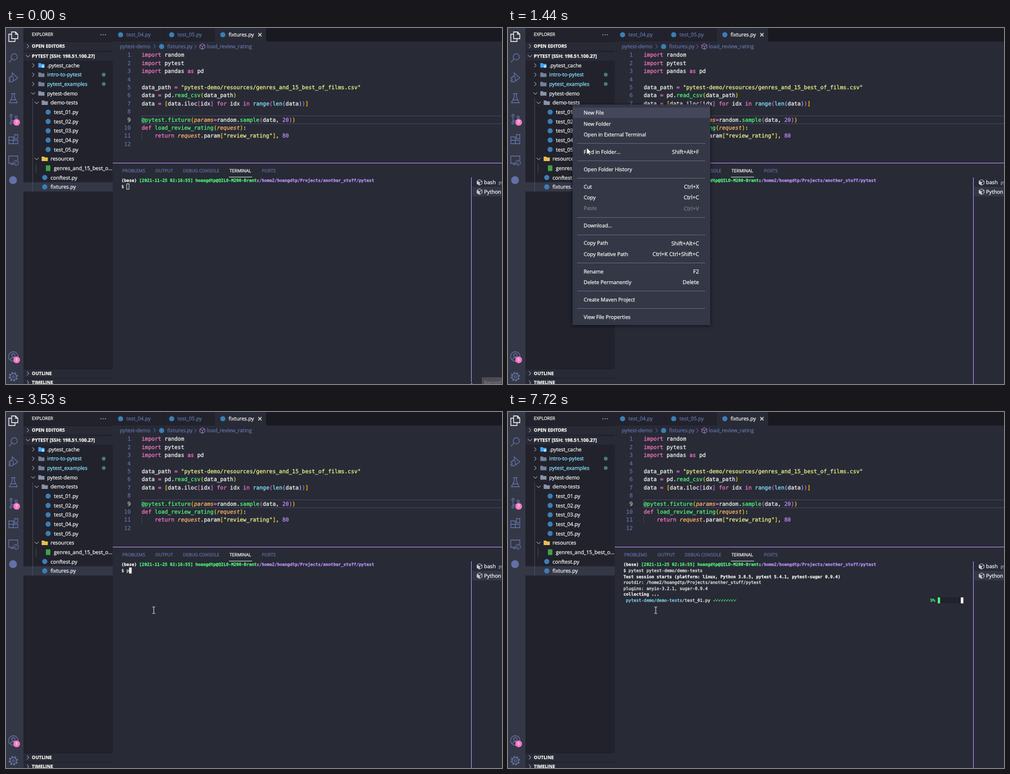
These frames come from a looping animation (883x634 px, 8000 ms). An HTML page:

```html
<!DOCTYPE html>
<html lang="en">
<head>
<meta charset="utf-8">
<title>Running tests from the editor</title>
<style>
html, body { margin: 0; width: 100%; height: 100%; overflow: hidden; background: #282a36; }
svg { display: block; width: 100%; height: 100%; }
text { white-space: pre; font-family: "Open Sans", "Noto Sans", sans-serif; text-rendering: geometricPrecision; stroke-width: .25px; }
.mono { font-family: "DejaVu Sans Mono", "Noto Sans Mono", monospace; }
.tick { font-family: "DejaVu Sans", sans-serif; }
</style>
</head>
<body>
<svg id="stage" viewBox="0 0 883 634"></svg>
<script>
const C = { fg: '#f8f8f2', dim: '#6272a4', bg: '#282a36', side: '#21222c', bar: '#343746', sel: '#44475a',
  p: '#ff79c6', y: '#f1fa8c', g: '#50fa7b', o: '#ffb86c', n: '#bd93f9', c: '#8be9fd' };
const LOOP = 8000, USER = 'hoangdtp', HOME = `/home2/${USER}/Projects/another_stuff/pytest`;

// Drawing helpers; text is placed by its vertical centre, on a whole-pixel baseline.
const ink = col => `fill="${col}" stroke="${col}"`;
const text = (x, y, s, size = 9.25, fill = C.fg, more = '') =>
  `<text x="${x}" y="${Math.round(y + size * .35)}" font-size="${size}" ${ink(fill)} ${more}>${s}</text>`;
const rect = (x, y, w, h, fill, more = '') => `<rect x="${x}" y="${y}" width="${w}" height="${h}" fill="${fill}" ${more}/>`;
const disc = (x, y, r, fill) => `<circle cx="${x}" cy="${y}" r="${r}" fill="${fill}"/>`;
const line = (x, y, d, stroke, w = 1, more = '') =>
  `<path transform="translate(${x} ${y})" d="${d}" fill="none" stroke="${stroke}" stroke-width="${w}" ${more}/>`;
const bold = 'font-weight="700"';
const right = 'text-anchor="end"';
const span = (fill, s, more = '') => `<tspan ${ink(fill)} ${more}>${s}</tspan>`;
const chevron = (x, y, open, col = '#c5c8d4') => line(x, y, open ? 'M-3.5-1.8 0 1.8 3.5-1.8' : 'M-1.8-3.5 1.8 0-1.8 3.5', col, 1);
const folder = (x, y, fill) => `<path transform="translate(${x} ${y})" d="M-5.5-4h4.2l1.4 1.5h5.4v6.5h-11z" fill="${fill}"/>`;
const pyIcon = (x, y) => disc(x, y, 4.6, '#3c7eb5');
const cube = (x, y, col, w = 1) => line(x, y, 'M0-5 4.5-2.5V2.5L0 5-4.5 2.5V-2.5ZM-4.5-2.5 0 0 4.5-2.5M0 0V5', col, w);
const shellIcon = y => cube(843, y, '#c5c8d4') + `<path transform="translate(843 ${y})" d="M-4.5-2.5 0 0V5L-4.5 2.5Z" fill="#c5c8d4"/>`;

function activityBar() {
  const icon = (y, d, col = C.dim) => line(13, y, d, col, 1.3);
  const badge = (y, s) => disc(19, y, 6, C.p) + text(19, y, s, 7, C.fg, 'text-anchor="middle"');
  const ring = r => `M${-r} 0a${r} ${r} 0 1 0 ${2 * r} 0a${r} ${r} 0 1 0 ${-2 * r} 0`;
  return rect(0, 0, 31, 634, C.bar) +
    icon(15, 'M-3-8H4L8-4V4H-3ZM4-8V-4H8M-3-4H-8V9H3V4', C.fg) +
    icon(52, 'M-3 2a5.5 5.5 0 1 1 2 2ZM-2 3-8 9') +
    icon(89, 'M-2-3V-9L8 0 1 5M-6 0a3 3 0 0 1 6 0v4a3 3 0 0 1-6 0ZM-9-1l3 2M-9 4h3M-8 8l2-2M0 4h3') +
    icon(125, 'M-4-8H4M-2-8V-2L-7 8H7L2-2V-8M-5 3H5') +
    icon(162, 'M-6-6a2 2 0 1 0 4 0a2 2 0 1 0-4 0M-4-4V5M-6 7a2 2 0 1 0 4 0a2 2 0 1 0-4 0M3-3a2 2 0 1 0 4 0a2 2 0 1 0-4 0M5-1Q5 3-4 3') + badge(168, 7) +
    icon(198, 'M-8-4H0V8H-8ZM-8 2H8V8H0M2-8H8V-1H2Z') +
    icon(235, 'M0 6H-8V-7H8V0M-4 8H0') + line(18, 240, ring(4.3), C.dim, 1.2) + line(18, 240, 'M-2-1 0 1-2 3M2-3 0-1', C.dim, 1) +
    disc(12.5, 271, 7, C.dim) +
    icon(585, ring(8.5) + 'M-3-2a3 3 0 1 0 6 0a3 3 0 1 0-6 0M-6 6Q0-2 6 6') + badge(591, 1) +
    line(13, 621, ring(6.8), C.dim, 3, 'stroke-dasharray="3 2.34"') + line(13, 621, ring(5.5), C.dim, 1.3) + line(13, 621, ring(2), C.dim, 1.2);
}

const rowY = i => 66.5 + 16.65 * i;

function sidebar() {
  // kind: > closed folder, v open folder, p Python file, x table
  const tree = [
    ['>', 0, '.pytest_cache', '#42a5f5'], ['>', 0, 'intro-to-pytest', '#76809a', 1], ['>', 0, 'pytest_examples', '#76809a', 1],
    ['v', 0, 'pytest-demo', '#8a93ab'], ['v', 1, 'demo-tests', '#8a93ab'],
    ...[1, 2, 3, 4, 5].map(n => ['p', 2, `test_0${n}.py`]),
    ['v', 1, 'resources', '#eac04c'], ['x', 2, 'genres_and_15_best_o...'], ['p', 1, 'conftest.py'], ['p', 1, 'fixtures.py']];
  let s = rect(31, 0, 159, 634, C.side) + text(46, 11, 'EXPLORER', 7.9) + [169, 173, 177].map(x => disc(x, 12, .8, C.fg)).join('');
  for (const [y, label, open] of [[32.5, 'OPEN EDITORS', 0], [50, '', 1], [615, 'OUTLINE', 0], [631.5, 'TIMELINE', 0]])
    s += rect(31, y - 8.5, 159, 16.6, C.bg) + rect(31, y - 8.5, 159, .8, '#191a21') + chevron(39, y, open) + text(46, y, label, 8.1, C.fg, bold);
  s += rect(31, rowY(13) - 8.3, 159, 16.6, C.bar) + '<g id="hover"></g>' +
    line(47.5, 0, 'M0 125V291', '#505363', .8) + line(53.5, 0, 'M0 242V258', '#505363', .8);
  tree.forEach(([kind, depth, name, col, changed], i) => {
    const x = 63 + 6 * depth, y = rowY(i);
    if (kind == 'p') s += pyIcon(x, y);
    else if (kind == 'x') s += rect(x - 4, y - 5, 8, 10, '#43a047');
    else s += chevron(x - 14.5, y, kind == 'v') + folder(x, y, col);
    if (!i) s += disc(x + 3, y + 2, 2.4, '#b3dcfb');
    s += text(x + 10.3, y, name, 9.25, changed ? C.c : C.fg);
    if (changed) s += disc(174, y, 3.3, '#467f74');
  });
  return s + '<g id="header"></g>';
}

const code = ['{p import} random', '{p import} pytest', '{p import} pandas {p as} pd', '',
  'data_path {p =} {y "pytest-demo/resources/genres_and_15_best_of_films.csv"}',
  'data {p =} pd.{g read_csv}(data_path)',
  'data {p =} [data.iloc[idx] {p for} idx {p in} {c range}({c len}(data))]', '',
  '{g @pytest.fixture}({o params}{p =}random.{g sample}(data, {n 20}))',
  '{p def} {g load_review_rating}({o request}):',
  '    {p return} {o request}.param[{y "review_rating"}], {n 80}', ''];

function paint(src) {
  const levels = ['#ffd700', '#da70d6', '#87cefa'];
  let depth = 0;
  return src.replace(/\{(\w) ([^}]*)\}|[\[(]|[\])]/g, (m, key, s) =>
    key ? span(C[key], s, key == 'o' ? 'font-style="italic"' : '')
      : span(levels['[('.includes(m) ? depth++ : --depth], m));
}

function editor() {
  let s = rect(190, 0, 693, 24, '#191a21') + rect(190, 0, 182, 24, C.side) + rect(372, 0, 91, 24, C.bg) + rect(281, 0, .8, 24, '#191a21');
  ['test_04.py', 'test_05.py', 'fixtures.py'].forEach((name, i) => {
    const x = 204 + 91 * i;
    s += pyIcon(x, 12) + text(x + 10.3, 12, name, 9.25, i == 2 ? C.fg : C.dim);
  });
  s += line(452, 12, 'M-3-3 3 3M3-3-3 3', C.fg, 1.1);
  s += text(202.5, 33, 'pytest-demo', 9.3, C.dim) + chevron(264.5, 33, 0, C.dim) + pyIcon(277, 33) +
    text(287, 33, 'fixtures.py', 9.3, C.dim) + chevron(337, 33, 0, C.dim) + cube(349.5, 33, '#b180d7') +
    text(357.5, 33, 'load_review_rating', 9.3, C.dim);
  s += rect(241.5, 156.5, 660, 14, 'none', `stroke="${C.sel}"`) + line(241.7, 0, 'M0 185V199', '#44475a', .8);
  code.forEach((src, i) => {
    const y = 48 + 14.4 * i;
    s += text(222, y, i + 1, 9.68, i == 8 ? '#c6c6c6' : C.dim, `class="mono" ${right}`) + text(241.5, y, paint(src), 9.68, C.fg, 'class="mono"');
  });
  return s;
}

// Terminal grid
const CW = 4.55, CH = 10.65;
const col = n => 205.5 + CW * n;
const rowTop = n => 266.3 + CH * n;
const term = (row, c, s, fill = C.fg, more = '') => text(col(c), rowTop(row) + 5.3, s, 7.558, fill, `class="mono" ${more}`);

function panel() {
  let s = rect(190, 240, 693, 1, C.n);
  [[207, 'PROBLEMS'], [266, 'OUTPUT'], [315, 'DEBUG CONSOLE'], [398, 'TERMINAL'], [455.5, 'PORTS']]
    .forEach(([x, name]) => s += text(x, 254, name, 7.9, name == 'TERMINAL' ? C.fg : C.dim));
  s += rect(397, 265, 41, 1, '#dcdce0') + rect(828, 266, 1, 368, C.n) + rect(830, 283, 53, 17, C.bar) +
    shellIcon(275) + text(851, 275, 'bash') + text(877, 275.5, 'pytest', 8, '#a0a3b0') +
    shellIcon(291.5) + text(851, 291.5, 'Python');
  return s + term(0, 0, '(base) ' + span(C.g, `[2021-11-25 02:16:55] ${USER}@QILO-M200-Brant`) + ':' + span(C.n, HOME), C.fg, bold) + '<g id="term"></g>';
}

// Context menu: null starts a new group
const items = [];
const menu = (() => {
  let y = 151, s = '';
  for (const e of ['New File', 'New Folder', 'Open in External Terminal', null, 'Find in Folder...|Shift+Alt+F', null,
    'Open Folder History', null, 'Cut|Ctrl+X', 'Copy|Ctrl+C', 'Paste|Ctrl+V', null, 'Download...', null,
    'Copy Path|Shift+Alt+C', 'Copy Relative Path|Ctrl+K Ctrl+Shift+C', null, 'Rename|F2', 'Delete Permanently|Delete', null,
    'Create Maven Project', null, 'View File Properties']) {
    if (!e) {
      s += rect(123, Math.round(y - 4), 228, 1, '#646779');
      y += 11.7;
      continue;
    }
    const [name, keys = ''] = e.split('|'), fill = name == 'Paste' ? '#7d808c' : C.fg;
    if (name != 'Paste') items.push(y);
    s += text(134.7, y, name, 9.2, fill) + text(340, y, keys, 9.6, fill, right);
    y += 19.3;
  }
  return rect(115, 136.3, 245, 392.7, C.bar, 'style="filter:drop-shadow(0 1px 3px #000a)"') + '<g id="pick"></g>' + s;
})();

const pointers = {
  arrow: '<path d="M0 0V12.5L2.9 9.8 4.9 14 6.8 13.1 4.9 9.1H8.7Z" fill="#fff" stroke="#000" stroke-width=".7"/>',
  hand: '<path d="M-1.5 1q0-2 1.5-2 1.5 0 1.5 2v4l5 1.2q2 .6 1.8 3l-.8 5h-7l-4.5-5.5q0-2 2-1.5l.5.8z" fill="#fff" stroke="#000" stroke-width=".9"/>',
  beam: line(0, 0, 'M-2.5-6Q0-6 0-5 0-6 2.5-6M0-5V5M-2.5 6Q0 6 0 5 0 6 2.5 6', '#e8e8e8')
};

const path = [[0, 828, 631], [70, 828, 631], [200, 770, 590], [440, 470, 385], [640, 215, 205], [840, 115, 136],
  [1170, 115, 136], [1370, 131, 156], [1440, 140, 213], [1710, 163, 348], [1780, 167, 376], [1850, 171, 398], [1990, 171, 402],
  [2190, 171, 402], [2350, 188, 392], [2550, 245, 362], [2720, 263, 353], [LOOP, 263, 353]];

function mouse(t) {
  const i = Math.max(1, path.findIndex(k => k[0] > t));
  const [a, b] = [path[i - 1], path[i]], f = (t - a[0]) / (b[0] - a[0]);
  return [a[1] + (b[1] - a[1]) * f, a[2] + (b[2] - a[2]) * f];
}

const headerIcons = line(125, 50, 'M0 5H-4V-5H1L4-2V0M3 2V7M.5 4.5H5.5', C.fg, .9) + line(143, 50, 'M0 4H-5V-4H-1L0-3H5V0M3 2V7M.5 4.5H5.5', C.fg, .9) +
  line(161, 50, 'M3.5-2.5A4.3 4.3 0 1 0 4.3 1M4-5V-2H1', C.fg, 1) + line(179, 50, 'M-2-2V-4H5V2H3M-5-2H3V4H-5ZM-3 1H1', C.fg, .9);
const header = over => over ? text(46, 50, 'PYTEST [SSH: 1...', 8.4, C.fg, bold) + headerIcons
  : text(46, 50, 'PYTEST [SSH: 198.51.100.27]', 8.4, C.fg, bold);

const report = ['Test session starts (platform: linux, Python 3.8.5, pytest 5.4.1, pytest-sugar 0.9.4)',
  `rootdir: ${HOME}`, 'plugins: anyio-3.2.1, sugar-0.9.4', 'collecting ...'];

function terminal(t) {
  const cmd = 'pytest pytest-demo/demo-tests';
  const typed = t < 3530 ? 0 : t < 3860 ? 1 : t < 4980 ? Math.min(7, 2 + Math.floor((t - 3860) / 92)) : cmd.length;
  let s = term(1, 0, '$ ' + cmd.slice(0, typed)), row = 1, c = 2 + typed;
  if (t >= 5390) [row, c] = [2, 0];
  if (t >= 6050) {
    report.forEach((r, i) => s += term(i + 2, 0, r, C.fg, i % 3 ? '' : bold));
    [row, c] = [5, 15];
  }
  if (t >= 6510) {
    const passed = t < 6910 ? 2 : t < 7310 ? 3 : t < 7720 ? Math.min(7, 4 + Math.floor((t - 7310) / 90)) : 9;
    const xs = Array.from({ length: passed }, (_, i) => col(35 + i)).join(' ');
    s += term(6, 1, span(C.c, 'pytest-demo/demo-tests/') + 'test_01.py') +
      text(xs, rowTop(6) + 5.3, '✓'.repeat(passed), 7.558, C.g, 'class="tick"') + term(6, 120, passed + '%', C.g) +
      rect(col(123), rowTop(6), CW * 10, CH, C.side) + rect(col(123), rowTop(6), CW * Math.floor(passed * .8) / 8, CH, C.g);
    [row, c] = [6, 132];
  }
  return s + (t < 2720 ? rect(col(c) + .3, rowTop(row) + .5, CW - .4, CH - 1, 'none', `stroke="${C.fg}" stroke-width=".9"`)
    : rect(col(c), rowTop(row), CW, CH, C.fg));
}

const $ = id => document.getElementById(id);
$('stage').innerHTML = rect(0, 0, 883, 634, C.bg) + editor() + panel() + sidebar() + activityBar() +
  `<g id="tip">${rect(847, 622, 36, 12, '#4c4c52') + text(851, 631.5, 'Record', 9.25, '#7d7d82')}</g><g id="menu">${menu}</g><g id="mouse"></g>`;

function draw(now) {
  const t = now % LOOP, [x, y] = mouse(t);
  const open = t >= 1040 && t < 2190, over = x < 190 && !open;
  const row = Math.floor((y - 58.2) / 16.65);
  $('hover').innerHTML = over && row >= 0 && row < 13 ? rect(31, rowY(row) - 8.3, 159, 16.6, C.bar) : '';
  $('header').innerHTML = header(over);
  $('tip').style.display = t < 70 ? '' : 'none';
  $('menu').style.display = open ? '' : 'none';
  // The highlight trails the pointer a little.
  const lagY = mouse(Math.max(0, t - 70))[1], hit = items.find(v => Math.abs(v - lagY) < 9.6);
  $('pick').innerHTML = open && hit ? rect(115, hit - 9.2, 244.5, 18.4, C.sel) : '';
  $('term').innerHTML = terminal(t);
  const kind = t < 70 || open && t < 1790 ? 'arrow' : x < 190 ? 'hand' : 'beam';
  $('mouse').innerHTML = `<g transform="translate(${x} ${y})">${pointers[kind]}</g>`;
}

let start;
function tick(now) {
  start ??= now;
  draw(now - start);
  requestAnimationFrame(tick);
}
draw(0);
requestAnimationFrame(tick);
</script>
</body>
</html>
```
